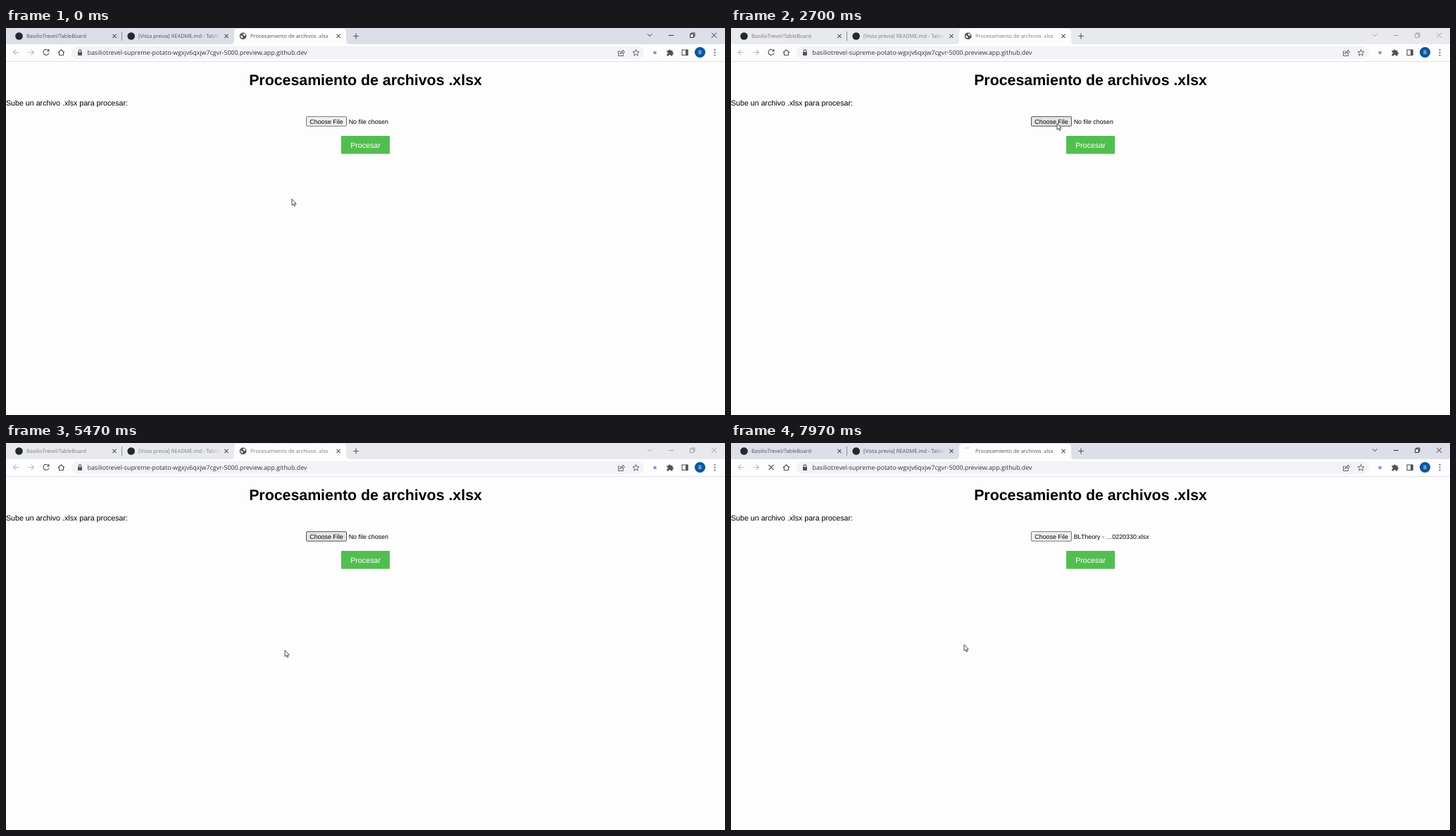
Recreate the animation shown at these times as an HTML page. Size 1021x549 px, loop 8000 ms.

```html
<!DOCTYPE html>
<html lang="es">
<head>
<meta charset="utf-8">
<title>Procesamiento de archivos .xlsx</title>
<style>
  html, body { margin: 0; width: 100%; height: 100%; overflow: hidden; background: #fdfdfd; }
  svg { display: block; width: 1021px; height: 549px; text-rendering: geometricPrecision; }
  text { font-family: "Liberation Sans", Arial, sans-serif; white-space: pre; }
  .ui text { font-family: "Open Sans", "Noto Sans", sans-serif; font-size: 7.46px; fill: #50535a; }
  .ui .url { font-size: 8.83px; fill: #303338; }
  .line { fill: none; stroke: #505357; stroke-width: 1.1; }
  .win { stroke: #303236; stroke-width: 1; }
  .away .strip { fill: #e7e9ed; }
  .away .win { stroke: #a0a2a6; }
  .away .tab { fill: #797c82; }
  .strip { fill: #dddfe8; }
  .small { font-size: 8.89px; }
  .body { font-size: 10.67px; }
</style>
</head>
<body>
<svg viewBox="0 0 1021 549">
  <defs>
    <linearGradient id="fade" gradientUnits="userSpaceOnUse" x1="288" x2="304">
      <stop offset="0" stop-color="#fff"/><stop offset="1" stop-color="#fff" stop-opacity="0"/>
    </linearGradient>
    <mask id="cut"><path d="M180 0h124v23h-124z" fill="url(#fade)"/></mask>
    <path id="close" d="M-2.6-2.6 2.6 2.6M2.6-2.6-2.6 2.6"/>
  </defs>

  <g class="ui" id="chrome">
    <path class="strip" d="M0 0h1021v23H0z"/>
    <path d="M319 23q5 0 5-5V6q0-5 5-5h149q5 0 5 5v12q0 5 5 5z" fill="#fdfdfd"/>
    <path d="M0 23h1021v24H0z" fill="#fdfdfd"/>
    <path d="M0 47.5h1021" stroke="#dfe0e6"/>
    <rect x="93" y="26" width="813" height="18" rx="9" fill="#f2f3f6"/>

    <g fill="#24272c"><circle cx="18.5" cy="11.5" r="5.3"/><circle cx="177.7" cy="11.5" r="5.3"/></g>
    <text class="tab" x="29" y="14">BasilioTrevel/TableBoard</text>
    <text class="tab" x="188" y="14" mask="url(#cut)">[Vista previa] README.md - TableBoard</text>
    <text class="tab" x="347" y="14">Procesamiento de archivos .xlsx</text>
    <path d="M164.5 5v13" stroke="#8b8e96"/>
    <g class="line" stroke-width="1.2">
      <use href="#close" x="154" y="11.5"/><use href="#close" x="313" y="11.5"/><use href="#close" x="472" y="11.5"/>
      <path d="M493 11.5h8M497 7.5v8"/>
    </g>
    <g id="globe">
      <circle cx="336.6" cy="11.4" r="4.9" fill="#53565b"/>
      <path d="M333 11q2-.6 3 .8t-.5 2.8q-2.4-.6-2.5-3.6M336.5 8.2q2.3-1.2 3.6 1.3-.5 2-2 1.6t-1.6-2.9" fill="#f4f4f6"/>
    </g>
    <path id="spinner" class="line" d="M0-4.8A4.8 4.8 0 0 1 4.3-2.1" style="stroke:#c3c7da"/>

    <g class="line win">
      <path d="M911 8.5l3.2 3.2 3.2-3.2M941 10.5h7M971.5 8.5h5v5h-5zM973 8.5v-1.5h5v5h-1.500"/>
      <path d="M1002 6.800l7 7M1009 6.800l-7 7"/>
    </g>

    <g class="line">
      <path d="M18.500 34.500h-8M14.300 30.700l-3.800 3.800 3.800 3.800M31.500 34.500h8M35.700 30.700l3.800 3.800-3.800 3.800" style="stroke:#b9bbc0"/>
      <path id="reload" d="M60.500 32.300a4 4 0 1 0 .5 3M61 30v3h-3"/>
      <path id="stop" d="M53.500 31l7 7M60.500 31l-7 7"/>
      <path d="M74 35l4.500-4.200L83 35M75.500 34v4.500h6V34"/>
      <path d="M103.200 34v-1.300a1.800 1.800 0 0 1 3.600 0V34"/>
      <path d="M872 33h-2.500v6.500h7V37.500M871.500 37q.5-4 4.500-4v-2l2.500 3-2.500 2.800v-2q-3-.2-4.500 2.200" style="stroke-width:.9"/>
      <path d="M894.500 30.500l1.300 3 3.200.3-2.400 2.100.7 3.200-2.800-1.700-2.800 1.700.7-3.200-2.400-2.100 3.200-.3z" style="stroke-width:.9"/>
      <rect x="960" y="31" width="8" height="7.500"/>
    </g>
    <g fill="#505357">
      <rect x="102" y="34" width="6" height="5" rx=".7"/>
      <path d="M938.500 32h2.500a1.400 1.400 0 0 1 2.800 0h2.700v2.600a1.400 1.400 0 0 1 0 2.800v2.100h-2.500a1.400 1.400 0 0 0-2.800 0h-2.700v-2.500a1.400 1.400 0 0 0 0-2.800z"/>
      <path d="M965 31h3.500v8H965z"/>
      <circle cx="1006.500" cy="31" r="1"/><circle cx="1006.500" cy="34.700" r="1"/><circle cx="1006.500" cy="38.400" r="1"/>
    </g>
    <rect x="919.500" y="33" width="4" height="4" fill="#958bd6"/>
    <circle cx="985.500" cy="34.500" r="7.600" fill="#0b57a0"/>
    <text x="985.500" y="37.300" text-anchor="middle" style="fill:#fff">B</text>
    <text class="url" x="115.500" y="38.200">basiliotrevel-supreme-potato-wgxjv6qxjw7cgvr-5000.preview.app.github.dev</text>
  </g>

  <text x="510.500" y="81" text-anchor="middle" font-size="21.333" font-weight="bold">Procesamiento de archivos .xlsx</text>
  <text class="body" x="0" y="109.700">Sube un archivo .xlsx para procesar:</text>
  <rect id="choose" x="426.500" y="125.700" width="57" height="13.500" rx="1.300"/>
  <text class="small" x="431.300" y="135.500">Choose File</text>
  <text class="small" id="file" x="486.700" y="135.500"></text>
  <rect id="send" x="476" y="153" width="69" height="25.600"/>
  <text class="body" x="510.500" y="169.700" text-anchor="middle" fill="#fff">Procesar</text>

  <g id="cursor" stroke="#2b2b35" stroke-width=".85" stroke-linejoin="round" fill="#fff">
    <path id="arrow" d="M0 0v9l2-1.800 1.400 3 1.500-.7-1.400-2.800H6.200z"/>
    <path id="hand" d="M-.9.800q.9-1.200 1.800 0v4l3.300.8q1.200.4 1 1.800l-.8 4.600h-5L-3.300 8q-.6-1.400.8-1.300l1.600 1.200z"/>
  </g>
</svg>
<script>
const LOOP = 8000, DIALOG = [2620, 5700], LOAD = 6580;
// time, x, y of the pointer tip
const path = [
  [0, 406, 242.5], [350, 412, 252], [840, 470, 272], [1200, 533, 218.5],
  [1670, 500, 157], [2050, 468, 133.5], [2650, 468, 133.5], [3230, 238.5, 217.5],
  [4200, 238.5, 217.5], [4970, 330, 268], [5420, 396, 294], [5620, 396, 294],
  [5840, 440, 209], [6200, 509.8, 169], [6850, 509.8, 169], [7450, 331, 286], [LOOP, 331, 286]
];
const $ = id => document.getElementById(id);
const show = (id, on) => $(id).style.display = on ? '' : 'none';
const inside = (x, y, l, t, r, b) => x >= l && x <= r && y >= t && y <= b;

function pointer(t) {
  const i = path.findIndex(p => p[0] > t);
  const [t0, x0, y0] = path[i - 1], [t1, x1, y1] = path[i];
  const u = (t - t0) / (t1 - t0), e = u * u * (3 - 2 * u);
  return [x0 + (x1 - x0) * e, y0 + (y1 - y0) * e];
}

function draw() {
  const t = performance.now() % LOOP;
  const [x, y] = pointer(t);
  const away = t >= DIALOG[0] && t < DIALOG[1], loading = t >= LOAD;
  const overChoose = away || inside(x, y, 426, 125, 484, 140);
  const overSend = !away && inside(x, y, 476, 153, 545, 179);

  $('chrome').classList.toggle('away', away);
  $('choose').setAttribute('fill', overChoose ? '#e3e4e3' : '#f0f0f0');
  $('choose').setAttribute('stroke', overChoose ? '#555' : '#777');
  $('send').setAttribute('fill', overSend ? '#459a42' : '#53be50');
  $('file').textContent = t < DIALOG[1] ? 'No file chosen' : 'BLTheory - …0220330.xlsx';

  show('globe', !loading);
  show('reload', !loading);
  show('spinner', loading);
  show('stop', loading);
  const turn = -40 - (t - 7970) * 0.27;
  $('spinner').setAttribute('transform', `translate(336.600 11.500) rotate(${turn})`);

  show('arrow', !overSend);
  show('hand', overSend);
  $('cursor').setAttribute('transform', `translate(${x} ${y})`);
  requestAnimationFrame(draw);
}
draw();
</script>
</body>
</html>
```
